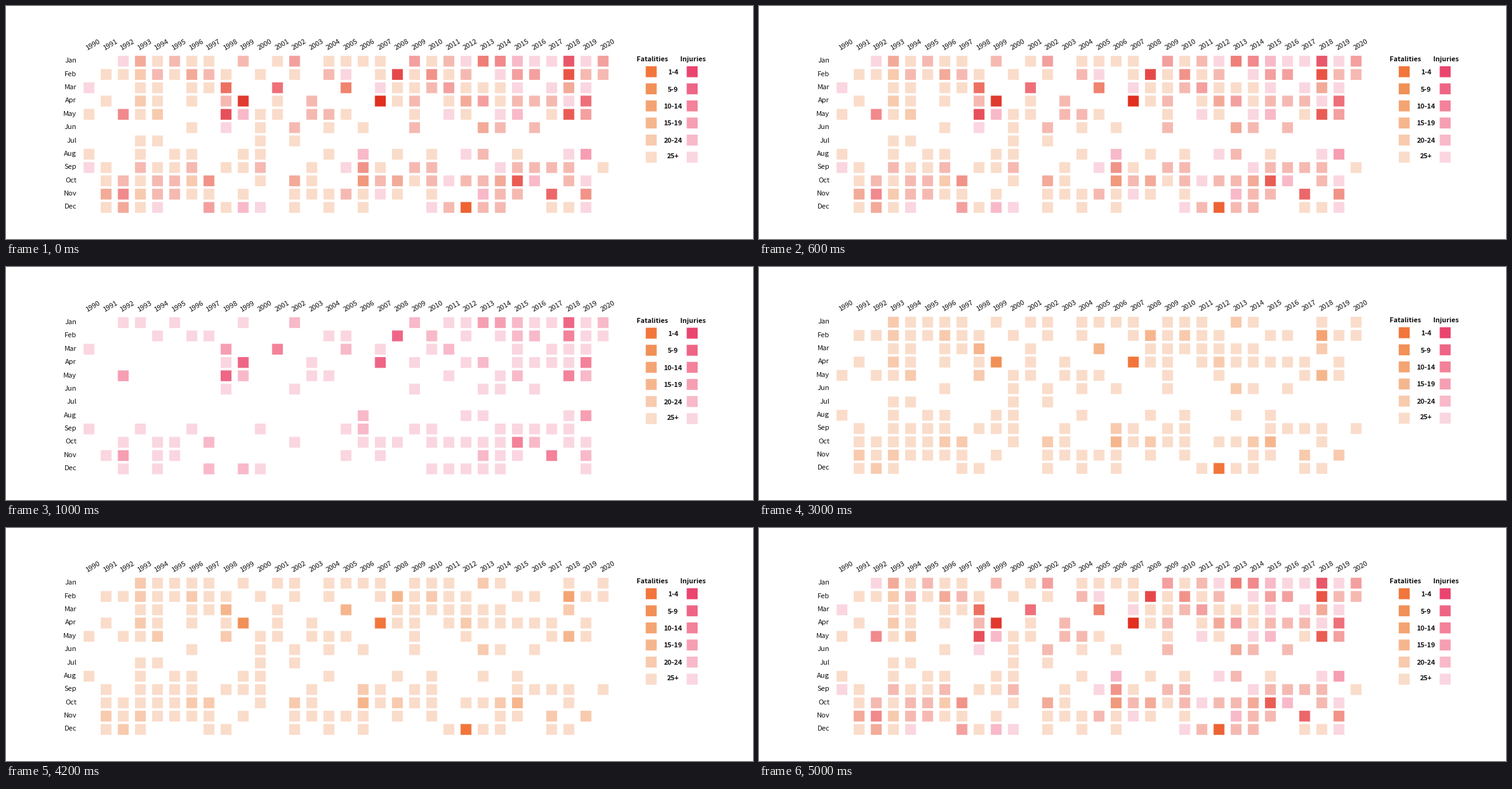
Recreate the animation shown at these times as a matplotlib script. Size 1200 by 375 pixels, loop 6000 ms.

```python
import numpy as np
import matplotlib.pyplot as plt
from matplotlib.animation import FuncAnimation
from matplotlib.colors import to_rgb
from matplotlib.patches import Rectangle

W, H, DPI = 1200, 375, 100
FONT = "Noto Sans CJK JP"
MONTHS = "Jan Feb Mar Apr May Jun Jul Aug Sep Oct Nov Dec".split()
BANDS = ["1-4", "5-9", "10-14", "15-19", "20-24", "25+"]

# Palettes run from the lightest band (1) to the darkest (6).
ORANGE = ["#fadcca", "#f8caae", "#f6b68d", "#f4a472", "#f19057", "#f2763b"]
PINK = ["#fad6e0", "#f8b9c9", "#f69fb2", "#f3829a", "#ee6586", "#ea456f"]

# One row per month; the groups are the 1990s, 2000s, 2010s and 2020.
FATALITIES = """
...21111.1 .11.1111.1 11.21...1. 1
.11211211. 1.1.1..131 211..11.41 1
...11.113. .1...3..11 11111...2. .
.1.21.1.15 .1.1...611 .1211111.1 .
1.112...2. 11.111...1 ..1....131 .
......1... 1.1.1.1..1 ...21.1... .
...11..... 1.1....... .......... .
1..1.11..1 1...1...1. 1..1.1.... .
.1.1111.11 1..1..21.1 1....1111. 1
.1111122.. 1.21..3121 1.1123..1. .
.2121111.1 ..11111.1. 1...11.2.2 .
.121...11. ..1.1.1... .1611..11. .
"""
INJURIES = """
..11.1...1 ..2......2 .113321151 2
....1.11.. ....11..5. 2.1.122.41 1
1.......3. .4...2.1.. 12...1.111 .
........15 ...1...5.1 ..12.11114 .
..3.....52 ...11..... .1..12..42 .
........1. ..1......1 ...11.1... .
.......... .......... .......... .
.......... ......2... ..11....13 .
1..1..1... 1....12..1 1...11111. .
..1.11.2.. ..1...111. 1111142.11 .
.13.11.... .....1.1.. ...211.4.2 .
..1.1..2.2 1......... 11111....1 .
"""

X0, Y0, DX, DY = 133.3, 88.8, 27.53, 21.4
CELL, KEY = 17.4, 17.6
PINK_DROP = 0.7  # the injuries view sits slightly lower


def cell_colors(text, palette):
    """Month by year array of colours, white where there is no event."""
    lookup = {".": (1, 1, 1)}
    lookup.update({str(i + 1): to_rgb(c) for i, c in enumerate(palette)})
    rows = [line.replace(" ", "") for line in text.split("\n") if line]
    return np.array([[lookup[ch] for ch in row] for row in rows])


fatal = cell_colors(FATALITIES, ORANGE)
injured = cell_colors(INJURIES, PINK)
VIEWS = {"both": fatal * injured, "injuries": injured, "fatalities": fatal}
TIMELINE = ["both", "injuries", "injuries", "fatalities", "fatalities", "both"]

fig = plt.figure(figsize=(W / DPI, H / DPI), dpi=DPI, facecolor="white")
ax = fig.add_axes([0, 0, 1, 1])
ax.set_xlim(0, W)
ax.set_ylim(H, 0)
ax.axis("off")


def square(x, y, size, color):
    return ax.add_patch(Rectangle((x - size / 2, y - size / 2), size, size,
                                  facecolor=color, linewidth=0, snap=False))


def label(x, y, text, px=11.2, **style):
    style = {"ha": "center", "va": "baseline", **style}
    return ax.text(x, y, text, family=FONT, fontsize=px * 72 / DPI,
                   color="#111111", **style)


cells = [[square(X0 + c * DX, Y0 + r * DY, CELL, "white")
          for c in range(fatal.shape[1])] for r in range(len(MONTHS))]

for r, name in enumerate(MONTHS):
    label(113.3, 91.3 + r * 21.38, name, ha="right")
for c in range(fatal.shape[1]):
    label(X0 - 2 + c * DX, 71, 1990 + c, ha="left", rotation=30,
          rotation_mode="anchor")

label(1038.5, 89, "Fatalities", 11, weight="bold")
label(1103.5, 89, "Injuries", 11, weight="bold")
for i, band in enumerate(BANDS):
    y = 105.8 + i * 27.5
    square(1036.5, y, KEY, ORANGE[5 - i])
    square(1102.3, y, KEY, PINK[5 - i])
    label(1071.3, y + (1.6 if band == "25+" else 4.2), band, 11, weight="bold")


def update(step):
    view = TIMELINE[step]
    drop = PINK_DROP if view == "injuries" else 0
    ax.set_ylim(H - drop, -drop)
    for row, colors in zip(cells, VIEWS[view]):
        for cell, color in zip(row, colors):
            cell.set_facecolor(color)
    return []


anim = FuncAnimation(fig, update, frames=len(TIMELINE), interval=1000,
                     repeat=True, repeat_delay=0, blit=False)
plt.show()
```
